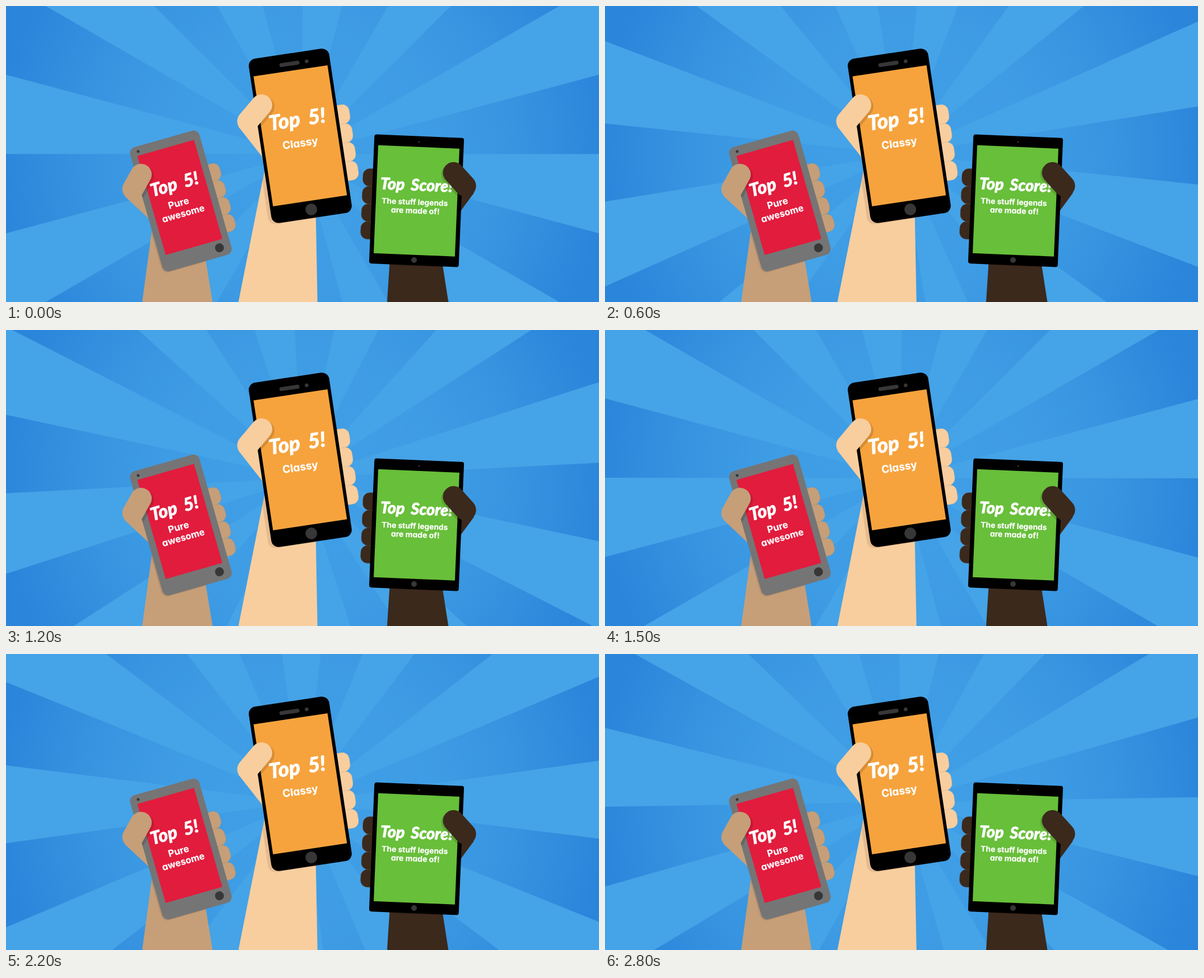
Write an HTML page that moves like this. It is 1058 px wide and 529 px high and loops after 2900 ms.

```html
<!DOCTYPE html>
<html lang="en">
<head>
<meta charset="utf-8">
<title>Top scores</title>
<style>
  html, body { margin: 0; width: 100%; height: 100%; overflow: hidden; background: #3f9de5; }
  svg { display: block; width: 100%; height: 100%; }
  text { fill: #fff; stroke: #fff; stroke-linejoin: round; text-anchor: middle; }
  .title { font-family: Lato, sans-serif; font-style: italic; font-weight: 700; word-spacing: .16em; letter-spacing: .01em; stroke-width: 1.3; }
  .sub { font-family: Inter, sans-serif; font-weight: 700; font-feature-settings: "cv11"; stroke-width: .2; }
</style>
</head>
<body>
<svg id="stage" viewBox="0 0 1058 529" preserveAspectRatio="none"></svg>
<script>
const STEP = 100, STEPS = 29;
const CENTER = { x: 529, y: 264.5 };
const turnKeys = [[0, 0], [4, 3.8], [9, 9], [12, 12.05], [19, 19.07], [25, 25.05], [28, 29.07]];

const devices = [
  {
    x: 312, y: 348.5, angle: -15.9, w: 128.5, h: 230.5, r: 11, body: '#757575',
    screen: { y: -6.7, w: 105, h: 184, fill: '#e21c3d' },
    dots: [[43.3, 99.3, 8], [-49, -106, 2.5]],
    skin: '#c69f79', crease: '#b8916b',
    fingers: { x: 82.5, y: -33.5, size: 31.5 },
    arm: 'M242 366L262 388L243 529H368.5L354 440Z',
    palm: 'M212 340L258 383L270 383L240 320Z',
    thumb: [241, 301, 226.5, 327], shade: [4, 3], cast: [-2, 2],
    title: ['Top 5!', -2.8, -21.2, 31.5],
    subs: [['Pure', -5, 8.3, 16.8], ['awesome', -2, 28.5, 16.5]]
  },
  {
    x: 525, y: 232, angle: -8.5, w: 145, h: 297, r: 13, body: '#000',
    screen: { y: 0, w: 133.4, h: 235, fill: '#f6a33d' },
    dots: [[0, 133, 10.5], [31, -130, 3.3]], speaker: true,
    skin: '#f8ce9f', crease: '#eabf8f',
    fingers: { x: 93, y: -27, size: 34 },
    arm: 'M456 268L462 290L414.7 529H555.7L552.5 360Z',
    palm: 'M415 216L459 272L475 272L450 205Z',
    thumb: [456, 177, 431.5, 206], shade: [4, 3], cast: [-6, 2],
    title: ['Top 5!', -1, -17.4, 36.5],
    subs: [['Classy', -2, 19.5, 19]]
  },
  {
    x: 732.5, y: 348, angle: 2.4, w: 160, h: 231, r: 4, body: '#000',
    screen: { y: .3, w: 145, h: 193, fill: '#68bf3a' },
    dots: [[0, 106, 5], [0, -105, 1.5]],
    skin: '#3b291c', crease: '#4e3b2d',
    fingers: { x: -97.3, y: -38, size: 31.5 },
    arm: 'M685 450L680 529H789.3L777 450Z',
    palm: 'M835 334L810 368L800 368L806 320Z',
    thumb: [798.5, 298, 819.7, 321.5], shade: [-3, 3], cast: [0, 2],
    title: ['Top Score!', -1, -18.3, 28.3],
    subs: [['The stuff legends', -3, 7.3, 13.8], ['are made of!', -1.5, 22.8, 14]]
  }
];

const box = (x, y, w, h, r, fill, extra = '') =>
  `<rect x="${x}" y="${y}" width="${w}" height="${h}" rx="${r}" fill="${fill}" ${extra}/>`;
const centered = (w, h, r, fill, y = 0) => box(-w / 2, y - h / 2, w, h, r, fill);
const disc = ([x, y, r]) => `<circle cx="${x}" cy="${y}" r="${r}" fill="#373737"/>`;
const label = (kind, [words, x, y, size]) =>
  `<text class="${kind}" font-size="${size}" x="${x}" y="${y}">${words}</text>`;

function fingers({ x, y, size }, fill, crease) {
  const left = x > 0 ? 40 : x;
  return [0, 1, 2, 3].map(i =>
    box(left, y + (i - .5) * size, Math.abs(x) - 40, size, 12, fill, `stroke="${crease}" stroke-width=".6"`)
  ).join('');
}

const thumbLine = ([x1, y1, x2, y2], color, extra = '') =>
  `<path d="M${x1} ${y1}L${x2} ${y2}" stroke="${color}" stroke-width="38" stroke-linecap="round" ${extra}/>`;

function drawDevice(d, i) {
  const place = `translate(${d.x} ${d.y}) rotate(${d.angle})`;
  const outline = `x="${-d.w / 2}" y="${-d.h / 2}" width="${d.w}" height="${d.h}" rx="${d.r}"`;
  const s = d.screen;
  return `
    <clipPath id="arm${i}"><path d="${d.arm}"/></clipPath>
    <clipPath id="body${i}"><rect ${outline} transform="${place}"/></clipPath>
    <path d="${d.arm}" fill="${d.skin}"/>
    <g clip-path="url(#arm${i})"><g transform="translate(${d.cast}) ${place}" opacity=".1">
      ${centered(d.w, d.h, d.r, '#3a1c00')}</g></g>
    <path d="${d.palm}" fill="${d.skin}"/>
    <g transform="${place}">
      ${fingers(d.fingers, d.skin, d.crease)}
      ${centered(d.w, d.h, d.r, d.body)}
      ${centered(s.w, s.h, 0, s.fill, s.y)}
      ${d.dots.map(disc).join('')}
      ${d.speaker ? centered(36, 7, 3, '#373737', -130) : ''}
      ${label('title', d.title)}
      ${d.subs.map(line => label('sub', line)).join('')}
    </g>
    <g clip-path="url(#body${i})">
      ${thumbLine(d.thumb, '#000', `opacity=".13" transform="translate(${d.shade})"`)}</g>
    ${thumbLine(d.thumb, d.skin)}`;
}

function drawRays() {
  const point = deg => {
    const a = deg * Math.PI / 180;
    return `${(650 * Math.cos(a)).toFixed(2)} ${(650 * Math.sin(a)).toFixed(2)}`;
  };
  let path = '';
  for (let deg = 0; deg < 360; deg += 30) path += `M0 0L${point(deg)}L${point(deg + 15)}Z`;
  return `<path id="rays" d="${path}" fill="#45a3e7"/>`;
}

document.getElementById('stage').innerHTML = `
  <radialGradient id="sky" gradientUnits="userSpaceOnUse" cx="${CENTER.x}" cy="${CENTER.y}" r="545">
    <stop offset="0" stop-color="#409fe6"/>
    <stop offset=".45" stop-color="#3e9ce4"/>
    <stop offset=".72" stop-color="#3793e0"/>
    <stop offset="1" stop-color="#2b85db"/>
  </radialGradient>
  ${box(0, 0, 1058, 529, 0, 'url(#sky)')}
  ${drawRays()}
  ${devices.map(drawDevice).join('')}`;

const rays = document.getElementById('rays');

function turnAt(step) {
  const next = Math.max(1, turnKeys.findIndex(([s]) => s >= step));
  const [s0, a0] = turnKeys[next - 1], [s1, a1] = turnKeys[next];
  return a0 + (a1 - a0) * (step - s0) / (s1 - s0);
}

function render(ms) {
  const step = Math.floor(ms / STEP) % STEPS;
  rays.setAttribute('transform', `translate(${CENTER.x} ${CENTER.y}) rotate(${turnAt(step)})`);
}

const start = performance.now();
function tick() {
  render(performance.now() - start);
  requestAnimationFrame(tick);
}
tick();
</script>
</body>
</html>
```
